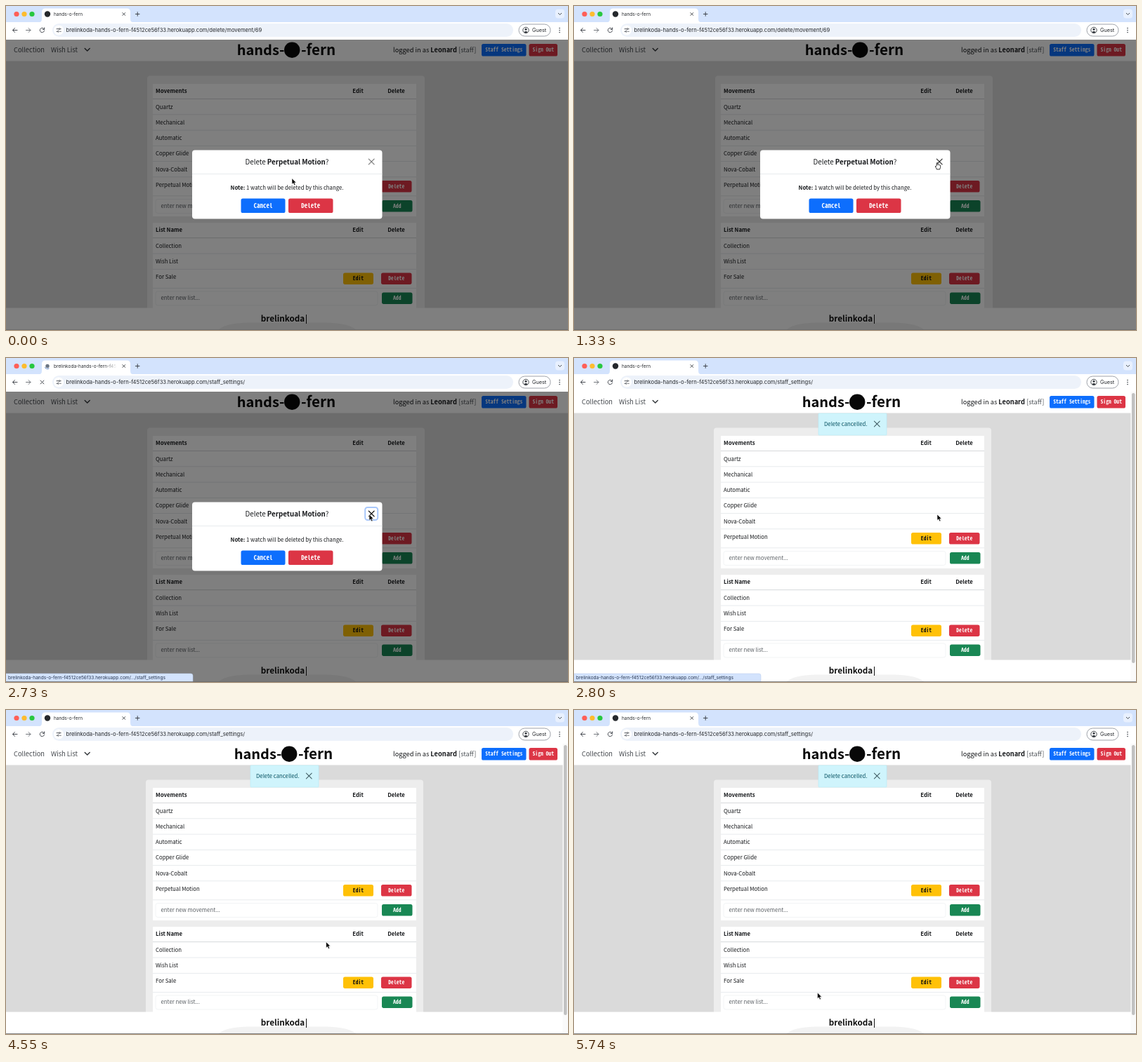
These frames come from a looping animation (800 by 462 pixels, 5950 ms). An HTML page:

```html
<!DOCTYPE html>
<html lang="en">
<head>
<meta charset="utf-8">
<title>hands-o-fern</title>
<style>
  html, body { margin: 0; width: 100%; height: 100%; overflow: hidden; background: #fff; }
  svg { display: block; width: 100vw; height: 100vh; }
  text { font: 7.8px "Noto Sans CJK JP", "Noto Sans", sans-serif; white-space: pre; }
  .ui { font-family: Inter, "Open Sans", sans-serif; }
  .mono { font-family: "Noto Sans Mono CJK JP", "Noto Sans Mono", monospace; }
  .b { font-weight: 700; }
  .mid { text-anchor: middle; }
  .line { fill: none; stroke-linecap: round; stroke-linejoin: round; }
</style>
</head>
<body>
<svg id="stage" viewBox="0 0 800 462"></svg>
<script>
const LOOP = 5950, STEP = 70;
const HOVER = 1190, STATUS = 1540, CLICK = 1820, COMMIT = 2730, LOADED = 2800;
const SITE = 'brelinkoda-hands-o-fern-f4512ce56f33';
const HOST = SITE + '.herokuapp.com';

const text = (x, y, s, size = 7.8, cls = '', fill = '#16181b', id = '') =>
  `<text id="${id}" x="${x}" y="${y}" class="${cls}" fill="${fill}" style="font-size:${size}px">${s}</text>`;
const rect = (x, y, w, h, fill, r = 0, extra = '') =>
  `<rect x="${x}" y="${y}" width="${w}" height="${h}" rx="${r}" fill="${fill}" ${extra}/>`;
const disc = (x, y, r, fill, extra = '') => `<circle cx="${x}" cy="${y}" r="${r}" fill="${fill}" ${extra}/>`;
const line = (d, color = '#474b52', w = 1, extra = '') =>
  `<path class="line" d="${d}" stroke="${color}" stroke-width="${w}" ${extra}/>`;
const cross = (x, y, r, color, w, extra) =>
  line(`M${x - r} ${y - r}l${2 * r} ${2 * r}m0 ${-2 * r}l${-2 * r} ${2 * r}`, color, w, extra);
const group = (id, body) => `<g id="${id}">${body}</g>`;

const BLUE = '#0d6efd', RED = '#dc3545', GREEN = '#198754', YELLOW = '#ffc107';
const button = (x, y, w, h, fill, label, size = 7.7, color = '#fff') =>
  rect(x, y, w, h, fill, 2.6) + text(x + w / 2, y + h / 2 + size * .35, label, size, 'mono b mid', color);
const rule = (y, color = '#dee2e6') => rect(209, y, 375, .7, color);

function table(top, title, names, hint) {
  let s = rect(209, top, 375, 189, '#fff') + text(213, top + 13.2, title, 7.8, 'b')
    + text(501, top + 13.2, 'Edit', 7.8, 'b mid') + text(555.5, top + 13.2, 'Delete', 7.8, 'b mid')
    + rule(top + 21.2, '#c4c8cc');
  names.forEach((name, i) => {
    const y = top + 35.5 + 22.25 * i;
    s += text(213, y, name);
    if (i < names.length - 1) s += rule(y + 8);
  });
  const y = top + 22.25 * names.length;
  return s + button(480, y + 4.5, 43, 16.5, YELLOW, 'Edit', 7.7, '#111')
    + button(534, y + 4.5, 43.5, 16.5, RED, 'Delete') + rule(y + 26)
    + rect(213, y + 31, 316, 20, '#fff', 3, 'stroke="#e9ecef" stroke-width=".6"')
    + text(220.5, y + 43.4, hint, 7.8, '', '#5c6166')
    + button(535, y + 32.5, 43.5, 16.5, GREEN, 'Add');
}

const page = rect(0, 48, 800, 414, '#dadada') + rect(0, 48, 800, 30.5, '#fff')
  + group('card', rect(199, 99.5, 395, 340, '#ededed', 4))
  + table(111, 'Movements',
      ['Quartz', 'Mechanical', 'Automatic', 'Copper Glide', 'Nova-Cobalt', 'Perpetual Motion'], 'enter new movement...')
  + table(309.2, 'List Name', ['Collection', 'Wish List', 'For Sale'], 'enter new list...')
  + rect(0, 430.5, 800, 32, '#fff')
  + '<path fill="#f2f2f2" d="M302 462C312 453 330 451.500 350 451.500H450C470 451.500 488 453 499 462z"/>'
  + group('bar', rect(792.5, 48, 7.5, 414, '#fafafa') + rect(794, 50, 4.5, 385, '#c1c1c1', 2.2));

const nav = text(11, 66, 'Collection', 9.3, '', '#44484d') + text(64, 66, 'Wish List', 9.3, '', '#44484d')
  + line('M112.200 60.500l3.500 3.500 3.500-3.500', '#33373b', 1.4)
  + group('logo', text(392.5, 70, 'hands-', 20, 'b', '#080808', 'brand') + disc(403.2, 62.7, 11.2, '#080808')
      + text(416, 70, '-fern', 20.6, 'b', '#080808'))
  + text(551, 66, 'logged in as <tspan class="b">Leonard</tspan> <tspan fill="#4d5257">[staff]</tspan>', 9.25)
  + button(677, 54, 63.5, 17.5, BLUE, 'Staff Settings', 7.6) + button(744.5, 54, 40.5, 17.5, RED, 'Sign Out', 7.6)
  + text(362.7, 450.2, 'brelinkoda', 11.7, 'b', '#111') + rect(427, 440, 1, 13, '#111');

const modal = rect(0, 48, 800, 414, 'rgba(0,0,0,.5)') + rect(265, 205.5, 270.5, 98, '#fff', 4)
  + rect(265, 239, 270.5, .7, '#dee2e6')
  + text(400, 225.5, 'Delete <tspan class="b">Perpetual Motion</tspan>?', 9.75, 'mid')
  + text(400, 262, '<tspan class="b">Note:</tspan> 1 watch will be deleted by this change.', 7.77, 'mid')
  + button(334.5, 274.5, 63, 20.5, BLUE, 'Cancel', 9) + button(402, 274.5, 63.5, 20.5, RED, 'Delete', 9)
  + rect(511.2, 213, 18, 18, 'none', 3.5, 'id="focus" stroke="#a9c8fb" stroke-width="2"')
  + cross(520.2, 222, 3.9, '#000', 1.25, 'id="close"')
  + disc(517.3, 223.3, 15, 'rgba(80,130,240,.1)', 'id="ring" stroke="#6f97ea" stroke-width="1.3"');

const alertBox = rect(348, 79, 97, 31, '#cff4fc', 1, 'stroke="#b6ecf8" stroke-width=".6"')
  + text(356, 96.7, 'Delete cancelled.', 7.75, '', '#055160') + cross(431.3, 94, 3.9, '#47646b', 1.1);

const chrome = rect(0, 0, 800, 24, '#d3e3fd') + rect(0, 23, 800, 25, '#fff')
  + ['#ff5f57', '#febc2e', '#28c840'].map((c, i) => disc(15 + 11 * i, 11.5, 3.6, c)).join('')
  + '<path fill="#fff" d="M46 23.500q5 0 5-5V8.500q0-5 5-5H172q5 0 5 5v10q0 5 5 5z"/>'
  + group('icon', disc(59, 11.5, 4.2, '#25282c'))
  + line('M59 7.500a4 4 0 0 1 4 4', '#547fc4', .9, 'id="spin"')
  + disc(59, 11.5, 2.7, '#6b7685', 'id="globe"')
  + text(68, 13.8, '', 6.5, 'ui', 'url(#fade)', 'tab')
  + cross(167.8, 11.5, 1.9, '#33373d', .9)
  + line('M184.400 11.500h5.600m-2.800-2.800v5.600', '#33373d', .9)
  + rect(782, 4.5, 13, 13, '#e8f0fe', 4) + line('M786.300 10.300l2.200 2.200 2.200-2.200', '#33373d', .9)
  + line('M16 34.500H9.500m3-3l-3 3 3 3') + line('M28.500 34.500H35m-3-3l3 3-3 3', '#73777d')
  + line('M54.400 33.200a3.200 3.200 0 1 0 .2 2M54.700 30.900v2.500h-2.500', '#474b52', 1, 'id="reload"')
  + cross(51.5, 34.5, 2.4, '#474b52', 1, 'id="stop"')
  + rect(66, 25, 656, 19, '#edf2fa', 9.5) + disc(75, 34.5, 7, '#fff')
  + line('M72 32.700h2.500M77 36.300h1.200M72 36.300h1.200M76.800 32.700h1.400', '#474b52', .9)
  + disc(75.8, 32.7, 1, 'none', 'stroke="#474b52" stroke-width=".8"')
  + disc(74.4, 36.3, 1, 'none', 'stroke="#474b52" stroke-width=".8"')
  + text(85.5, 37.2, '', 7.63, 'ui', '#25282c', 'url')
  + rect(730, 26, 45, 17, '#fff', 8.5, 'stroke="#747a85" stroke-width=".7"')
  + disc(740, 34.5, 4.2, 'none', 'stroke="#33373d" stroke-width=".9"') + disc(740, 33.3, 1.5, '#33373d')
  + '<path fill="#33373d" d="M737.200 37.300q2.800-2.400 5.600 0q-2.800 2.200-5.600 0z"/>'
  + text(749, 37.1, 'Guest', 7.3, 'ui', '#25282c')
  + [31.5, 34.5, 37.5].map(y => disc(788, y, .85, '#474b52')).join('');

const status = rect(-4, 450, 270, 16, '#d3e3fd', 3, 'stroke="#b9cbea" stroke-width=".5"')
  + text(3, 458.2, HOST + '/.../staff_settings', 6.55, 'ui', '#27364f');

const arrow = '<path d="M0 0V8.500L2 6.800 3.400 9.900 5 9.200 3.600 6.200H6.200z" fill="#000" stroke="#fff" stroke-width=".6"/>';
const hand = '<path d="M-.7 4.800V.8q.8-1 1.600 0v2.500q.8-.5 1.400.2.800-.4 1.300.3 1-.2 1 .8v2q0 1.300-.8 2.500v.8H-.7Q-1 8.300-2.700 6q0-1.200 1.300-.5z" fill="#fff" stroke="#000" stroke-width=".8"/>';

const stage = document.getElementById('stage');
stage.innerHTML = `<defs><linearGradient id="fade" gradientUnits="userSpaceOnUse" x1="140" x2="158">
    <stop stop-color="#25282c"/><stop offset="1" stop-color="#25282c" stop-opacity="0"/></linearGradient></defs>`
  + page + nav + group('modal', modal) + group('alert', alertBox) + chrome + group('status', status)
  + rect(0, 461.2, 800, .8, '#6a6a6a') + group('arrow', arrow) + group('hand', hand);

const el = {};
stage.querySelectorAll('[id]').forEach(e => { if (e.id) el[e.id] = e; });
el.brand.setAttribute('text-anchor', 'end');

const show = (id, on) => { el[id].style.display = on ? '' : 'none'; };
const set = (id, name, value) => el[id].setAttribute(name, value);
const label = (id, s) => { if (el[id].textContent !== s) el[id].textContent = s; };
const part = (t, a, b) => Math.min(1, Math.max(0, (t - a) / (b - a)));

function pointer(t) {
  if (t < 4200) {
    const u = part(t, 420, 1330), k = u * u * (3 - 2 * u);
    return [407 + 110 * k, 245.7 - 22.7 * k];
  }
  const left = 1 - part(t, 4200, 5460);
  return [346.5 + 170.5 * left ** 1.37, 403 - 180 * left ** 2.8];
}

function draw(t) {
  const open = t < LOADED, loading = t >= CLICK && open;
  const over = t >= HOVER && t < COMMIT, clicked = t >= CLICK;
  show('modal', open);
  for (const id of ['alert', 'bar']) show(id, !open);
  for (const id of ['spin', 'stop']) show(id, loading);
  for (const id of ['reload', 'icon']) show(id, !loading);
  show('globe', loading && t >= COMMIT);
  show('focus', clicked);
  show('ring', clicked && t < 2170);
  show('hand', over);
  show('arrow', !over);

  set('logo', 'transform', `translate(${open ? 4 : 0})`);
  set('card', 'transform', `translate(${open ? 2 : 0})`);
  set('close', 'opacity', clicked ? 1 : over ? .8 : .5);
  set('spin', 'transform', `rotate(${t * .45 % 360} 59 11.5)`);
  set('ring', 'r', 7 + 8 * part(t, CLICK - STEP, CLICK + STEP));
  set('ring', 'opacity', 1 - part(t, 1960, 2170));
  set('status', 'opacity', part(t, STATUS - STEP, STATUS + STEP) * (1 - part(t, 2940, 3220)));

  const [x, y] = pointer(t);
  for (const id of ['arrow', 'hand']) set(id, 'transform', `translate(${x} ${y})`);
  label('url', HOST + (t < COMMIT ? '/delete/movement/69' : '/staff_settings/'));
  label('tab', t >= COMMIT && open ? SITE.slice(0, 27) : 'hands-o-fern');
}

function tick() {
  const t = performance.now() % LOOP;
  draw(Math.floor(t / STEP) * STEP);
  requestAnimationFrame(tick);
}
tick();
</script>
</body>
</html>
```
